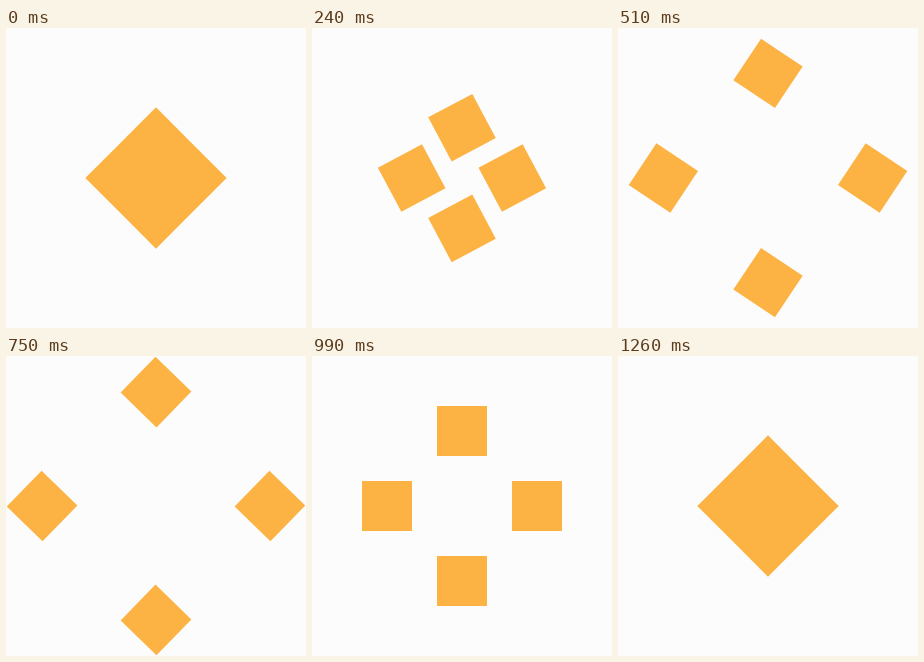
Write an HTML page that moves like this. It is 300 px wide and 300 px high and loops after 1470 ms.

```html
<!DOCTYPE html>
<html lang="en">
<head>
<meta charset="utf-8">
<title>Four squares</title>
<style>
  html, body { margin: 0; width: 100%; height: 100%; overflow: hidden; background: #fcfcfc; }
  svg { display: block; width: 100%; height: 100%; }
</style>
</head>
<body>
<svg viewBox="0 0 300 300"><path id="squares" fill="#fcb344"/></svg>
<script>
  const LOOP = 1470, STEP = 30, MOVE = 540;
  const OPEN_AT = 90, CLOSE_AT = 720;
  const CENTER = 150, RADIUS = 25 * Math.SQRT2;
  const NEAR = RADIUS, FAR = CENTER - RADIUS;
  const QUARTERS = [0, 1, 2, 3].map(i => i * Math.PI / 2);
  const path = document.getElementById('squares');

  function ease(time, start) {
    const t = Math.min(1, Math.max(0, (time - start) / MOVE));
    return t * t * (3 - 2 * t);
  }

  function square(cx, cy, turn) {
    const corners = QUARTERS.map(q =>
      (cx + RADIUS * Math.cos(q + turn)).toFixed(3) + ' ' +
      (cy + RADIUS * Math.sin(q + turn)).toFixed(3));
    return 'M' + corners.join('L') + 'Z';
  }

  // All squares share one path, so they join without seams when closed.
  function draw(ms) {
    const time = Math.floor((ms % LOOP) / STEP) * STEP;
    const spread = ease(time, OPEN_AT) - ease(time, CLOSE_AT);
    const distance = NEAR + (FAR - NEAR) * spread;
    const turn = spread * Math.PI / 2;
    path.setAttribute('d', QUARTERS.map(q => square(
      CENTER + distance * Math.cos(q),
      CENTER + distance * Math.sin(q),
      turn)).join(''));
  }

  const start = performance.now();
  function tick() {
    draw(performance.now() - start);
    requestAnimationFrame(tick);
  }
  tick();
</script>
</body>
</html>
```
